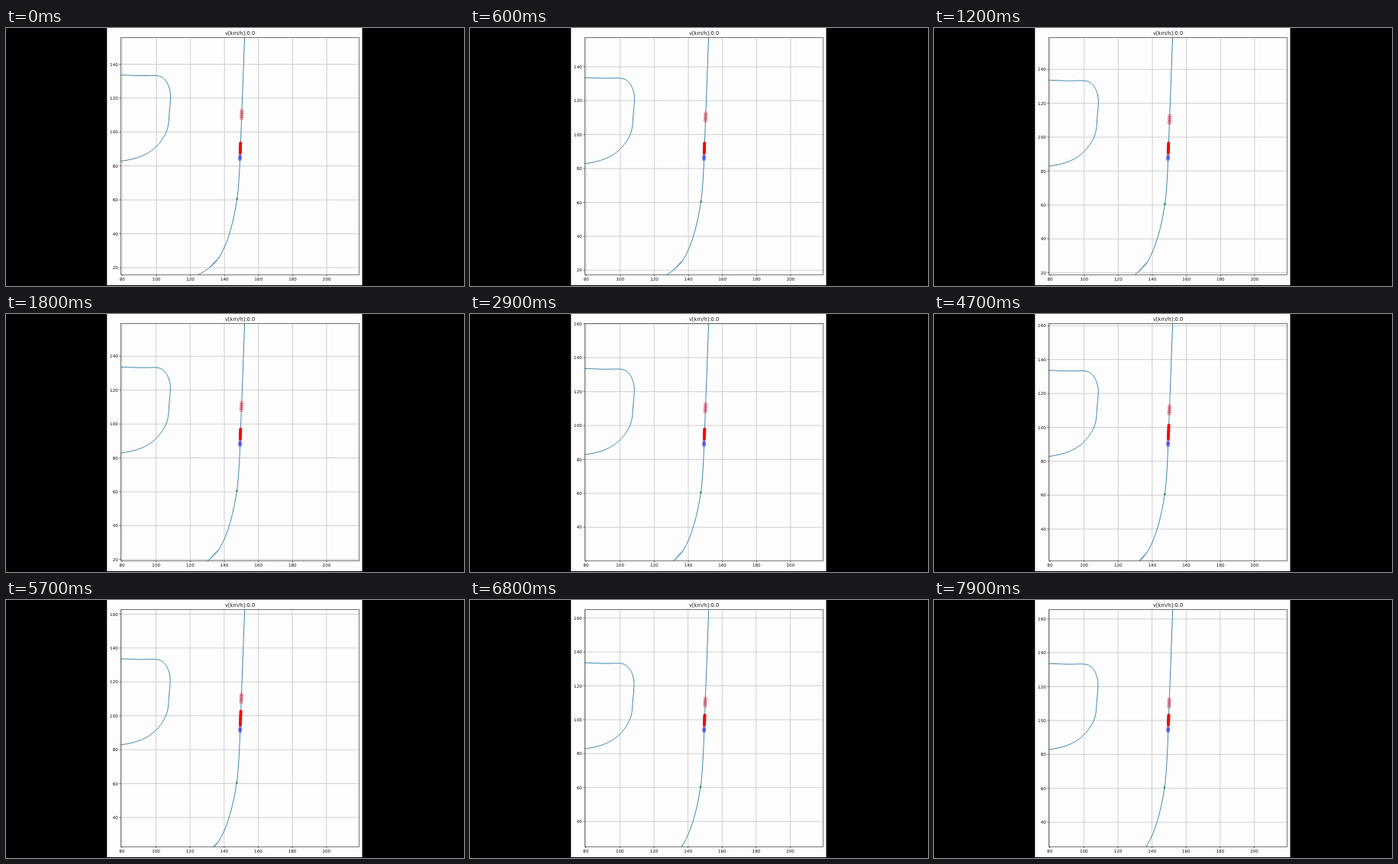
An HTML page that plays this animation: 600 by 338 pixels, repeating every 8 s.

```html
<!DOCTYPE html>
<html lang="en">
<head>
<meta charset="utf-8">
<title>Vehicle on a track</title>
<style>
  html, body { margin: 0; height: 100%; overflow: hidden; background: #000; }
  svg { display: block; width: 100vw; height: 100vh; }
  text { font: 5.6px "DejaVu Sans", sans-serif; fill: #111; text-anchor: middle; }
  #yTicks text { text-anchor: end; }
  .title { font-size: 6.75px; }
  .grid { stroke: #c0c0c0; stroke-width: .75; }
  .tick, .frame { stroke: #222; stroke-width: .65; fill: none; }
  .track { stroke: #4187b2; stroke-width: 1; fill: none; }
  .goal { stroke: #c8283f; stroke-width: .65; fill: none; }
  .car { stroke: #3434f0; stroke-width: .8; fill: #6a6af8; fill-opacity: .55; }
  .plan { fill: #f80808; }
  .centre { fill: #a4c8d0; }
  .star { fill: #0a800a; }
</style>
</head>
<body>
<svg viewBox="0 0 600 338">
  <clipPath id="axes"><rect x="150.3" y="12.7" width="312.5" height="310.5"/></clipPath>
  <rect x="132.3" width="334.3" height="337" fill="#fdfdfd"/>
  <g id="xTicks"></g>
  <g id="yTicks"></g>
  <g clip-path="url(#axes)">
    <g id="world">
      <path class="track" d="M313.6-15L309.3 100C307.2 150 306.3 200 302.7 224
        C298.5 251 292 280 279 301C273 309.5 263 318 251 323.5L242 327"/>
      <path class="track" d="M279.4 300.4Q275 304.5 267 313.6"/>
      <path class="track" d="M140 61.4C160 61.6 172 62.9 186 62.4C198 62 204 61.5 210 70
        C213 74.5 215.7 82 215.6 90C215.5 99 214.4 104 213.8 113
        C213 128 212.5 134 204.5 146C192 164 176 171 150 174.5L140 175.8"/>
    </g>
    <g id="vehicle"></g>
  </g>
  <rect class="frame" x="150.3" y="12.7" width="312.5" height="310.5"/>
  <text class="title" x="306.6" y="9.1">v[km/h]:0.0</text>
</svg>
<script>
const LEFT = 150.3, RIGHT = 462.8, TOP = 12.7, BOTTOM = 323.2;
const LOOP = 8, STEP = .1;

// seconds and distance the view has scrolled
const scroll = [[0, 0], [1.2, 6.7], [2.9, 9.8], [4.7, 12.2], [5.7, 15.4], [6.8, 20.6], [7.9, 21.6]];

const [xTicks, yTicks, world, vehicle] =
  ['xTicks', 'yTicks', 'world', 'vehicle'].map(id => document.getElementById(id));

function add(parent, tag, attrs, text = '') {
  const el = document.createElementNS('http://www.w3.org/2000/svg', tag);
  for (const k in attrs) el.setAttribute(k, attrs[k]);
  el.textContent = text;
  return parent.appendChild(el);
}

const line = (g, cls, x1, y1, x2, y2) => add(g, 'line', { class: cls, x1, y1, x2, y2 });
const dot = (g, cls, cx, cy, r) => add(g, 'circle', { class: cls, cx, cy, r });
const move = (el, x, y) => el.setAttribute('transform', `translate(${x} ${y})`);
const roadX = y => 306.5 + (170 - y) * .04;

for (let v = 80; v <= 200; v += 20) {
  const x = 152.3 + (v - 80) * 2.2325;
  line(xTicks, 'grid', x, TOP, x, BOTTOM);
  line(xTicks, 'tick', x, BOTTOM, x, BOTTOM + 2);
  add(xTicks, 'text', { x, y: 331.4 }, v);
}

const rows = [];
for (let v = 20; v <= 160; v += 20) {
  const y = 47.5 + (140 - v) * 2.2205;
  const g = add(yTicks, 'g', {});
  line(g, 'grid', LEFT, y, RIGHT, y);
  line(g, 'tick', LEFT - 2, y, LEFT, y);
  add(g, 'text', { x: 146.8, y: y + 2.1 }, v);
  rows.push({ g, y });
}

for (let i = 0; i < 5; i++) {
  const y = 108.4 + i * 2.45;
  dot(world, 'goal', roadX(y), y, 1.9);
}
const star = Array.from({ length: 10 }, (_, i) => {
  const r = i % 2 ? .8 : 1.9, a = i * Math.PI / 5;
  return [302.7 + r * Math.sin(a), 224 - r * Math.cos(a)];
});
add(world, 'polygon', { class: 'star', points: star.join(' ') });

const car = Array.from({ length: 3 }, () => dot(vehicle, 'car', 0, 0, 1.75));
const plan = Array.from({ length: 13 }, () => dot(vehicle, 'plan', 0, 0, 2));
const centre = dot(vehicle, 'centre', 0, 0, .7);

function scrollAt(t) {
  const i = Math.max(1, scroll.findIndex(([time]) => time >= t));
  const [t0, y0] = scroll[i - 1], [t1, y1] = scroll[i];
  return y0 + (y1 - y0) * (t - t0) / (t1 - t0);
}

function draw(seconds) {
  const t = Math.min(7.9, Math.floor(seconds % LOOP / STEP) * STEP);
  const dy = scrollAt(t), dx = -.03 * dy;
  move(world, dx, dy);
  move(xTicks, dx, 0);
  for (const { g, y } of rows) {
    const shown = y + dy >= TOP && y + dy <= BOTTOM;
    move(g, 0, dy);
    g.setAttribute('visibility', shown ? 'visible' : 'hidden');
  }
  const place = (el, y) => move(el, roadX(y - dy) + dx, y);
  // the planned run grows for a moment in the middle of the loop
  const top = 150.8 - 7.5 * Math.exp(-(((t - 5.2) / .8) ** 2));
  car.forEach((el, i) => place(el, 167.8 + 2 * i));
  plan.forEach((el, i) => place(el, top + (163.9 - top) * i / (plan.length - 1)));
  place(centre, 166.6);
}

const start = performance.now();
function frame() {
  draw((performance.now() - start) / 1000);
  requestAnimationFrame(frame);
}
frame();
</script>
</body>
</html>
```
